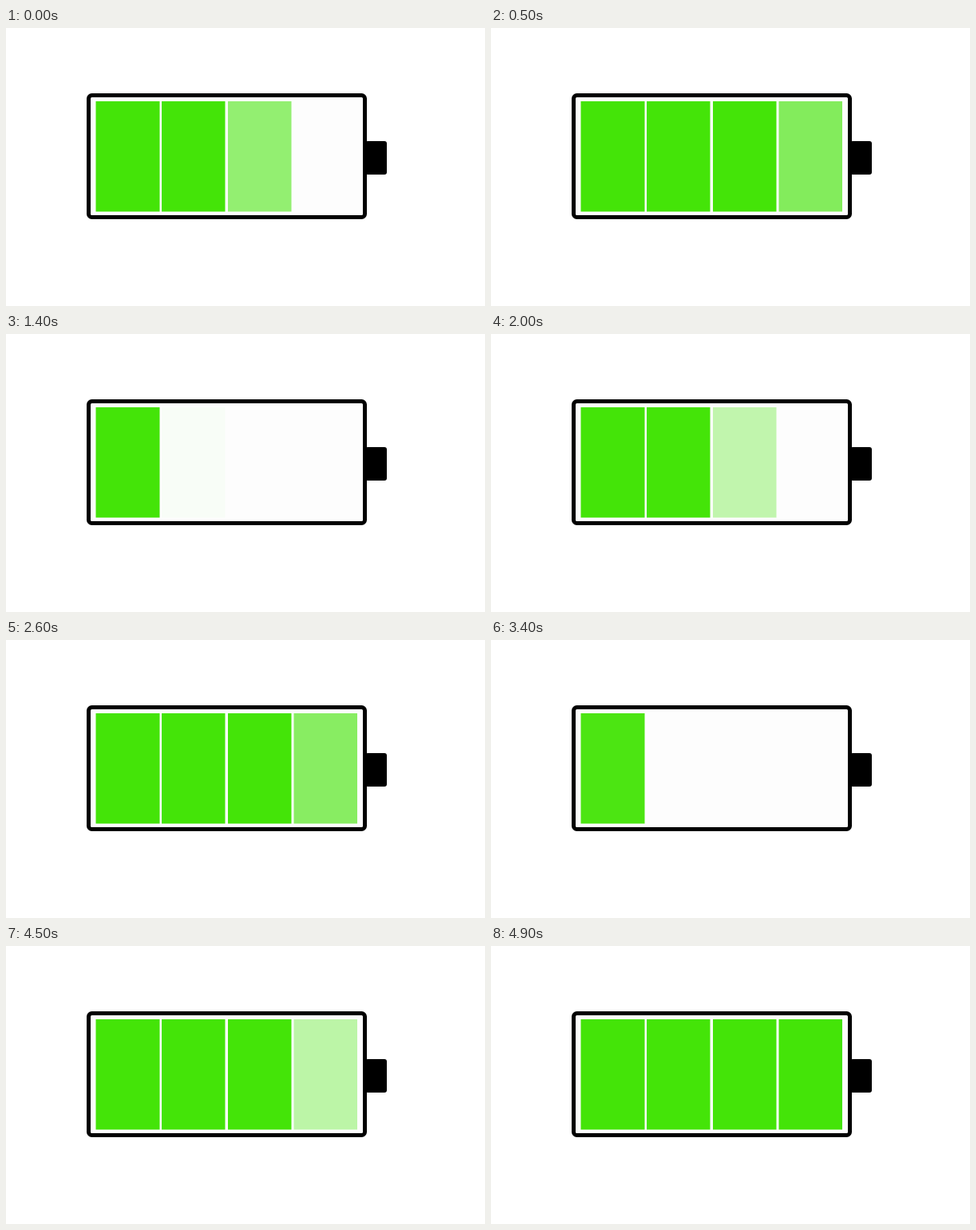
An HTML page that plays this animation: 600 px wide and 349 px high, repeating every 5 s.

```html
<!DOCTYPE html>
<html lang="en">
<head>
<meta charset="utf-8">
<title>Charging battery</title>
<style>
  html, body { margin: 0; width: 100%; height: 100%; overflow: hidden; background: #fff; }
  svg { display: block; width: 100%; height: 100%; }
</style>
</head>
<body>
<svg viewBox="0 0 600 349">
  <rect x="450" y="142" width="27" height="42" rx="3"/>
  <rect x="103.5" y="84.5" width="346" height="153" rx="4" fill="#fdfdfd" stroke="#000" stroke-width="5"/>
  <g fill="#44e408">
    <rect x="112.5" y="92" width="80" height="138.5"/>
    <rect x="195" y="92" width="79.5" height="138.5"/>
    <rect x="278" y="92" width="79.5" height="138.5"/>
    <rect x="360.5" y="92" width="79.5" height="138.5"/>
  </g>
</svg>
<script>
  const LOOP = 5000, STEP = 100, FADE = 460;
  const starts = [-1182, 930, 2960]; // when each charge begins, in ms
  const bars = document.querySelectorAll("g rect");

  function draw(time) {
    const t = Math.floor(time % LOOP / STEP) * STEP;
    const start = starts.filter(s => s <= t).pop();
    bars.forEach((bar, i) => {
      const level = (t - start) / FADE - i;
      bar.setAttribute("opacity", Math.min(1, Math.max(0, level)));
    });
  }

  const origin = performance.now();
  function tick() {
    draw(performance.now() - origin);
    requestAnimationFrame(tick);
  }
  tick();
</script>
</body>
</html>
```
